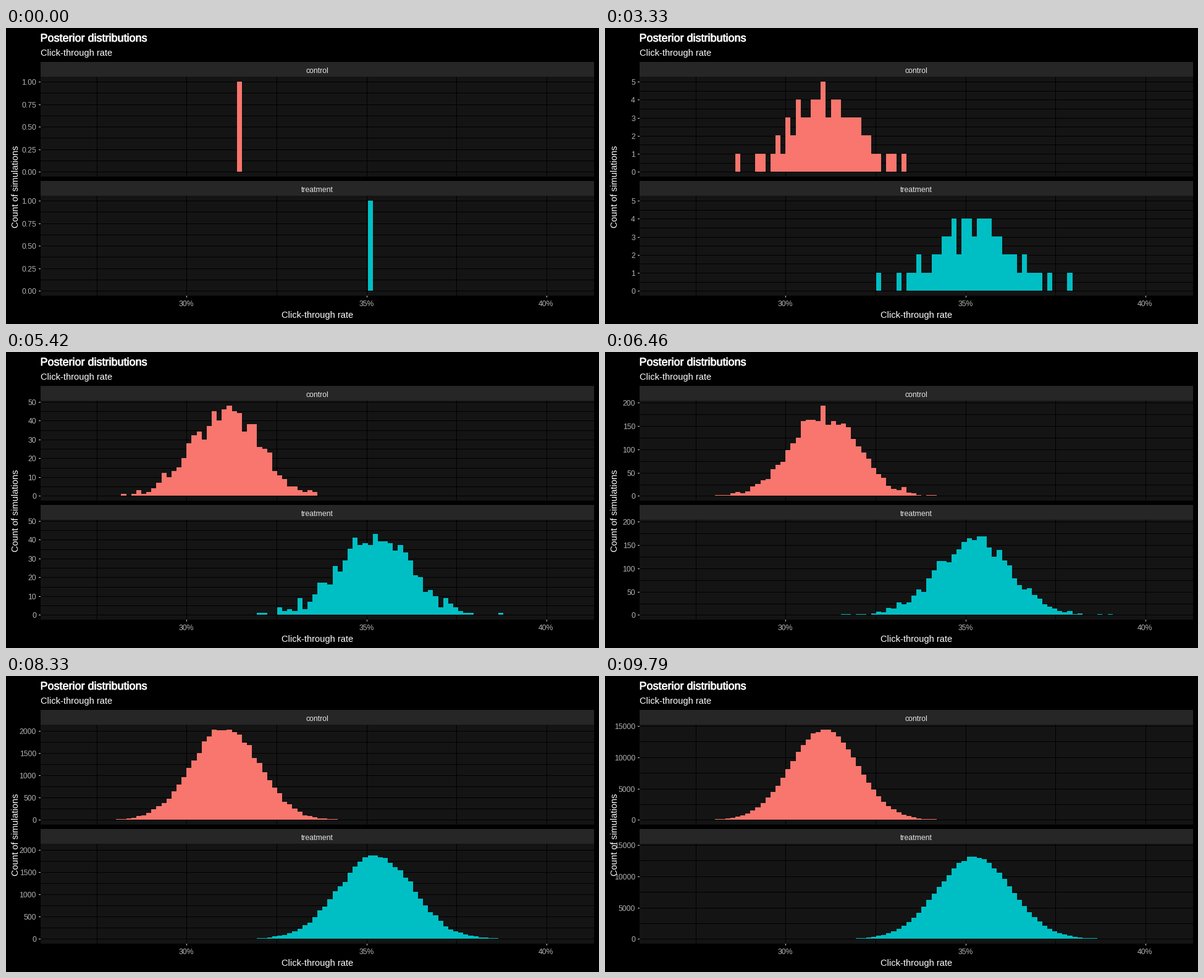
Animation of 960x480 px, one loop 10 s. Source, as a matplotlib script:

```python
import numpy as np
import matplotlib.pyplot as plt
from matplotlib.animation import FuncAnimation
from matplotlib.patches import Rectangle
from matplotlib.patheffects import withStroke

plt.rcParams["font.family"] = "Liberation Sans"

W, H, DPI = 960, 480, 96
LOOP, STATES, HOLD = 10000, 48, 5      # each state is held for HOLD frames
FRAMES = STATES * HOLD
BINS = 100
LEFT, RIGHT = 56, 952
EDGES = np.round(96.85 + 8.145 * np.arange(BINS + 1))
ZERO, RISE = 233.4, 146.5              # baseline of the upper panel, tallest bar
SHIFT = 193                            # distance between the two panels
SMALL = 9.2
GOLDEN = (5 ** 0.5 - 1) / 2
EVEN_DRAWS = 280
rng = np.random.default_rng(7)


def total(k):
    """Number of simulations shown in state k."""
    return round(0.543 * 1.3186 ** k + 1.3 * k + 0.457)


def simulate(mean, sd, start):
    """Bins of successive normal draws: evenly spread at first, then random."""
    cdf = np.cumsum(np.exp(-((np.arange(BINS) - mean) / sd) ** 2 / 2))
    even = (start + GOLDEN * np.arange(EVEN_DRAWS)) % 1
    rest = rng.random(total(STATES - 1) - EVEN_DRAWS)
    return np.searchsorted(cdf / cdf[-1], np.concatenate([even, rest]))


CONTROL = simulate(31.17, 6.64, 0.665)
TREATMENT = simulate(61.07, 7.3, 0.4415)


def nice_step(top):
    """Step of the best axis breaks from zero, scored like extended labelling."""
    best = (-np.inf, 1)
    for power in range(-1, 5):
        for rank, q in enumerate([1, 5, 2, 2.5, 4, 3]):
            step = q * 10.0 ** power
            for n in range(1, 10):
                last = n * step
                cover = 1 - 0.5 * ((top - last) / (0.1 * top)) ** 2
                ratio = (n / last) / (4 / max(last, top))
                density = 2 - max(ratio, 1 / ratio)
                score = 0.25 * (1 - rank / 5) + 0.2 * cover + 0.5 * density
                if score > best[0] + 1e-9:
                    best = (score, step)
    return round(best[1], 2)


# ---- stage -----------------------------------------------------------------

fig = plt.figure(figsize=(W / DPI, H / DPI), dpi=DPI, facecolor="black")
ax = fig.add_axes([0, 0, 1, 1])
ax.set_xlim(0, W)
ax.set_ylim(H, 0)
ax.axis("off")


def box(x, y, w, h, color, z=1):
    return ax.add_patch(Rectangle((x, y), w, h, facecolor=color, lw=0,
                                  antialiased=False, zorder=z))


def label(x, y, text, size, color="white", **kw):
    return ax.text(x, y, text, fontsize=size, color=color, va="baseline", **kw)


title = label(55.5, 22, "Posterior distributions", 13.5)
title.set_path_effects([withStroke(linewidth=0.5, foreground="white")])
label(56.5, 45, "Click-through rate", 11)
label(504, 470, "Click-through rate", 11, ha="center")
label(20, 257.5, "Count of simulations", 11, rotation=90, rotation_mode="anchor",
      ha="center")

for dy, name in ((0, "control"), (SHIFT, "treatment")):
    box(LEFT, 55 + dy, RIGHT - LEFT, 24, "#262626")
    box(LEFT, 79 + dy, RIGHT - LEFT, 162, "#141414")
    label(503.5, 73 + dy, name, SMALL, "#e5e5e5", ha="center")
    for x in (147, 292, 438, 584, 729, 875):
        box(x, 79 + dy, 1, 162, "black", 2)

for x, text in ((292, "30%"), (584, "35%"), (875, "40%")):
    box(x, 434, 1, 3, "#cccccc")
    label(x - 0.5, 451, text, SMALL, "#b3b3b3", ha="center")

moving = []
shown = None


def draw_panel(counts, top, step, dy, color):
    def row(value, nudge=0.0):
        return np.round(ZERO + nudge - RISE * value / top) + dy

    digits = 0 if step % 1 == 0 else 1 if (step * 10) % 1 == 0 else 2
    for value in np.arange(0, 1.05 * top, step / 2):
        moving.append(box(LEFT, row(value), RIGHT - LEFT, 1, "black", 2))
    for value in np.arange(0, 1.05 * top, step):
        y = row(value)
        moving.append(box(LEFT - 3, y, 3, 1, "#cccccc"))
        moving.append(label(49, y + 5, f"{value:.{digits}f}", SMALL, "#b3b3b3", ha="right"))

    base = row(0)
    for i in np.flatnonzero(counts):
        y = row(counts[i], -0.3)
        if y < base:
            moving.append(box(EDGES[i], y, EDGES[i + 1] - EDGES[i], base - y, color, 3))


def update(frame):
    global shown
    # states change one frame ahead of their nominal time
    k = min((frame + 1) // HOLD, STATES - 1)
    if k == shown:
        return moving
    shown = k
    for artist in moving:
        artist.remove()
    moving.clear()

    upper, lower = (np.bincount(draws[:total(k)], minlength=BINS)
                    for draws in (CONTROL, TREATMENT))
    top = max(upper.max(), lower.max())
    step = nice_step(top)
    draw_panel(upper, top, step, 0, "#f8766d")
    draw_panel(lower, top, step, SHIFT, "#00bfc4")
    return moving


anim = FuncAnimation(fig, update, frames=FRAMES, interval=LOOP / FRAMES,
                     init_func=lambda: update(0), repeat=True, repeat_delay=0, blit=False)
plt.show()
```
